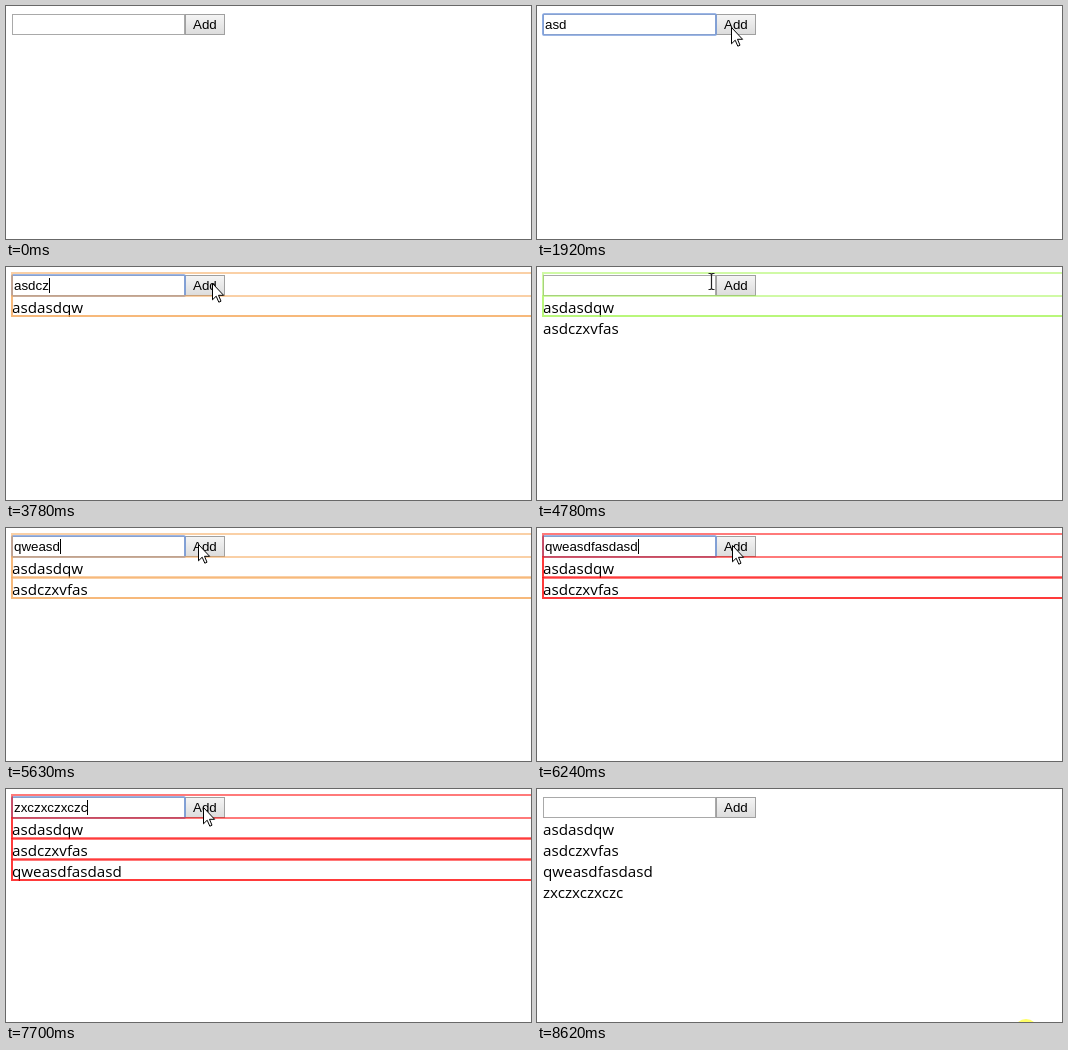
These frames come from a looping animation (525x233 px, 8.7 s). An HTML page:

```html
<!DOCTYPE html>
<html lang="en">
<head>
<meta charset="utf-8">
<title>Add to list</title>
<style>
  html, body { margin: 0; width: 100%; height: 100%; overflow: hidden; background: #fff; }
  svg { display: block; width: 525px; height: 233px; }
  .ui { font: 13.333px "Liberation Sans", Arial, sans-serif; }
  .list { font: 15.2px "Open Sans", "Noto Sans", sans-serif; }
  .outline { fill: none; stroke-width: 2; opacity: .52; }
</style>
</head>
<body>
<svg viewBox="0 0 525 233">
  <defs>
    <linearGradient id="face" x2="0" y2="1">
      <stop offset="0" stop-color="#f5f5f5"/>
      <stop offset="1" stop-color="#dcdcdc"/>
    </linearGradient>
  </defs>
  <rect x="6.5" y="8.5" width="172" height="20" fill="#fff" stroke="#a9a9a9"/>
  <rect x="179.5" y="8.5" width="39" height="20" fill="url(#face)" stroke="#a0a0a0"/>
  <text class="ui" x="187" y="23">Add</text>
  <rect id="ring" x="6" y="8" width="173" height="21" rx="1" fill="none" stroke="#7c9fdd" stroke-width="1.7"/>
  <text id="field" class="ui" x="8" y="23"></text>
  <rect id="caret" y="11" width="1" height="15" shape-rendering="crispEdges"/>
  <g id="list" class="list"></g>
  <g id="outlines"></g>
  <path id="arrow" d="M.5 .5V16.8L4.2 13.2L6.8 19.2L9 18.2L6.5 12.3H11.6Z" fill="#fff" stroke="#000"/>
  <path id="beam" d="M-3 -8H-1L0 -7L1 -8H3M0 -7V7M-3 8H-1L0 7L1 8H3" fill="none" stroke="#222" stroke-width="1.2"/>
  <circle id="spot" cx="489" cy="242" r="12" fill="#ffff66"/>
</svg>
<script>
const LOOP = 8700, STEP = 77, HOLD = 3, BLINK = 530, ROW = 21;
const HEAT = ['#55cef6', '#55f67b', '#a5f655', '#f4f655', '#f6a555', '#f66855', '#ff0000'];

// All times below are counted in steps.
const runs = [
  [13, 'asd'], [26, 'asd'], [30, 'qw'],
  [45, 'asdcz'], [51, 'xv'], [54, 'f'], [58, 'as'],
  [66, 'q'], [69, 'weasd'], [75, 'fasdasd'],
  [89, 'zx'], [92, 'czxczxczc']
];
const adds = [32, 60, 83, 102];
const clicks = [10, 41, 64, 87];
const pointer = [
  [2, 331, 158], [5, 115, 10], [6, 115, 10], [8, 118, 16], [9, 118, 16], [10, 118, 12],
  [13, 118, 12], [17, 192, 22], [20, 192, 22], [24, 194, 21], [36, 194, 21],
  [40, 165, 9], [43, 165, 10], [49, 206, 16], [53, 206, 16], [60, 200, 18],
  [62, 174, 14], [64, 160, 9], [67, 160, 10], [72, 192, 16], [77, 192, 16],
  [83, 196, 18], [86, 168, 11], [90, 168, 14], [96, 196, 17], [102, 198, 18],
  [105, 489, 240]
];

const events = [
  ...runs.flatMap(([at, text]) => [...text].map((char, i) => ({ at: at + i, char }))),
  ...adds.map(at => ({ at, add: true })),
  ...clicks.map(at => ({ at, focus: true }))
].sort((a, b) => a.at - b.at);

const $ = id => document.getElementById(id);
const show = (el, on) => el.setAttribute('visibility', on ? 'visible' : 'hidden');

function make(parent, tag, attrs) {
  const el = document.createElementNS('http://www.w3.org/2000/svg', tag);
  for (const key in attrs) el.setAttribute(key, attrs[key]);
  return $(parent).appendChild(el);
}

const rows = adds.map((_, i) => make('list', 'text', { x: 6, y: 46 + ROW * i }));
const outlines = adds.map(() => make('outlines', 'rect', { class: 'outline', x: 6, width: 600 }));

function stateAt(n) {
  const s = { value: '', items: [], focused: false, edited: 0, updated: -99, hits: 0, boxes: 0 };
  for (const e of events) {
    if (e.at > n) break;
    s.edited = e.at;
    if (e.focus) { s.focused = true; continue; }
    s.hits = e.at - s.updated < HOLD ? s.hits + 1 : 1;
    s.updated = e.at;
    s.boxes = s.items.length;
    if (e.add) {
      s.items.push(s.value);
      s.value = '';
      s.focused = false;
    } else {
      s.value += e.char;
    }
  }
  return s;
}

function pointerAt(n) {
  const i = pointer.findIndex(p => p[0] > n);
  if (i < 1) return null;
  const [a, x, y] = pointer[i - 1], [b, x2, y2] = pointer[i];
  const k = (n - a) / (b - a);
  return [Math.round(x + (x2 - x) * k), Math.round(y + (y2 - y) * k)];
}

function drawOutlines(s, n) {
  const hot = n - s.updated < HOLD;
  const color = HEAT[Math.min(s.hits, HEAT.length) - 1];
  outlines.forEach((box, i) => {
    show(box, hot && i <= s.boxes);
    if (!hot) return;
    // The first box wraps the whole app, the others wrap one item each.
    const top = i ? 29 + ROW * (i - 1) : 6;
    const bottom = 28 + ROW * (i || s.boxes);
    box.setAttribute('y', top);
    box.setAttribute('height', bottom - top);
    box.setAttribute('stroke', color);
  });
}

function drawPointer(n) {
  const p = pointerAt(n);
  const overField = p && p[0] < 179 && p[1] >= 8 && p[1] < 29;
  show($('arrow'), p && !overField);
  show($('beam'), overField);
  if (!p) return;
  const [x, y] = p;
  $('arrow').setAttribute('transform', `translate(${x} ${y})`);
  $('beam').setAttribute('transform', `translate(${x + .5} ${y + .5})`);
}

function render(time) {
  const n = Math.floor((time % LOOP + 12) / STEP);
  const s = stateAt(n);
  $('field').textContent = s.value;
  show($('ring'), s.focused);
  show($('caret'), s.focused && Math.floor((n - s.edited) * STEP / BLINK) % 2 === 0);
  $('caret').setAttribute('x', Math.round(8 + (s.value ? $('field').getComputedTextLength() : 0)));
  rows.forEach((row, i) => { row.textContent = s.items[i] || ''; });
  drawOutlines(s, n);
  drawPointer(n);
  show($('spot'), n >= 112);
}

const start = performance.now();
function tick() {
  render(performance.now() - start);
  requestAnimationFrame(tick);
}
tick();
</script>
</body>
</html>
```
